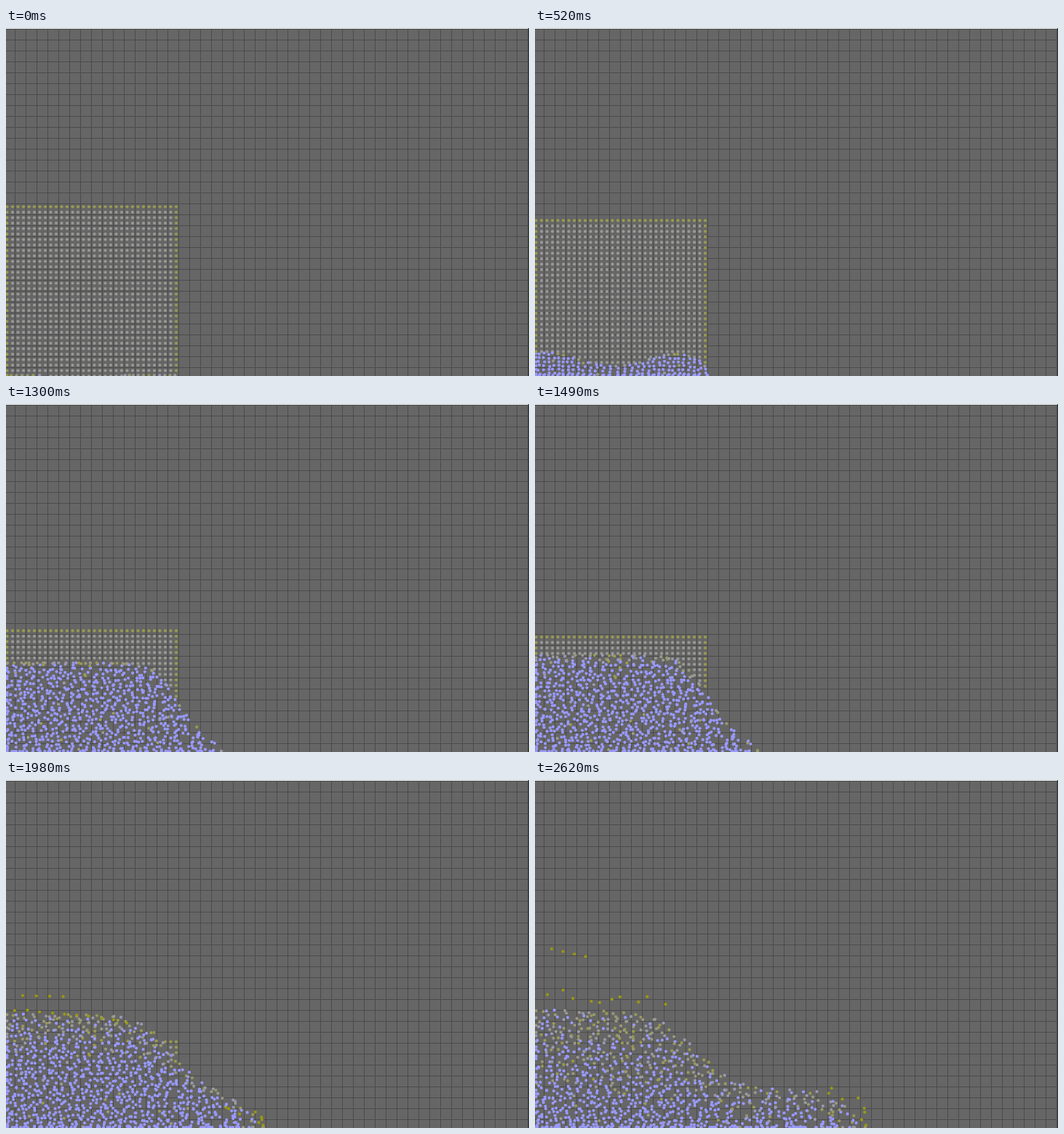
These frames come from a looping animation (719x478 px, 2.67 s). An HTML page with a canvas:

```html
<!DOCTYPE html>
<html lang="en">
<head>
<meta charset="utf-8">
<title>Particle block collapse</title>
<style>
html, body { margin: 0; width: 100%; height: 100%; overflow: hidden; background: #666; }
canvas { display: block; }
</style>
</head>
<body>
<canvas id="stage" width="719" height="478"></canvas>
<script>
const W = 719, H = 478, LOOP = 2670, N = 32, GAP = 7.5, EDGE = 237;
const ctx = document.getElementById('stage').getContext('2d');

const clamp = (v, a = 0, b = 1) => Math.max(a, Math.min(b, v));

// the simulation advances about every 110 ms, evenly between these moments
const marks = [20, 520, 940, 1300, 1750, 2220, 2620];
function stepTime(t) {
  if (t < marks[0]) return 0;
  const k = marks.findLastIndex(m => m <= t);
  if (k === marks.length - 1) return marks[k];
  const span = marks[k + 1] - marks[k];
  const step = span / Math.round(span / 110);
  return marks[k] + Math.floor((t - marks[k]) / step) * step;
}

function rand(n) {
  let h = Math.imul(n + 17, 0x9E3779B1);
  h = Math.imul(h ^ (h >>> 15), 0x85EBCA6B);
  h = Math.imul(h ^ (h >>> 13), 0xC2B2AE35);
  return ((h ^ (h >>> 16)) >>> 0) / 4294967296;
}

function dot(x, y, blue) {
  ctx.fillStyle = `rgb(153,153,${Math.round(blue)})`;
  ctx.beginPath();
  ctx.arc(x, y, 2.1, 0, Math.PI * 2);
  ctx.fill();
}

function drawGrid() {
  ctx.fillStyle = '#666';
  ctx.fillRect(0, 0, W, H);
  ctx.fillStyle = '#4b4b4b';
  for (let x = 12; x < W; x += 15) ctx.fillRect(x, 0, 1, H);
  for (let y = 1; y < H; y += 15) ctx.fillRect(0, y, W, 1);
  ctx.fillStyle = '#fff';
  ctx.fillRect(0, 0, W, 1);
  ctx.fillStyle = '#333';
  ctx.fillRect(W - 1, 0, 1, H);
}

const blockTop = t => 245.5 + 0.0268 * t + 1.84e-5 * t * t;
const frontX = t => EDGE + 218 * (t / 2620) ** 1.85;

// pile outline: a sinking shoulder on top of a low toe that runs to the right
function pileShape(t) {
  const full = 162 * (1 - Math.exp(-((t / 1127) ** 2.4)));
  const toe = 0.32 * full;
  const soft = 15 + 12 * clamp((t - 1500) / 700);
  const mid = 231 - 7 * clamp((t - 1750) / 800);
  const ripple = 10 * Math.exp(-(((t - 520) / 160) ** 2));
  const front = frontX(t);
  return x => {
    const body = (full - toe) / (1 + Math.exp((x - mid) / soft));
    const wave = ripple * Math.cos((x - 10) * Math.PI / 100);
    return toe * clamp((front - x) / 70) ** 0.6 + (body + wave) * clamp((front - x) / 20);
  };
}

// returns a function that maps a share of the pile's area to x
function areaMap(height, front) {
  const dx = 2, sums = [0];
  for (let x = 0; x < front; x += dx) {
    sums.push(sums[sums.length - 1] + Math.max(0, height(x + dx / 2)));
  }
  const total = sums[sums.length - 1];
  return share => {
    const goal = share * total;
    let k = 1;
    while (k < sums.length - 1 && sums[k] < goal) k++;
    const part = (goal - sums[k - 1]) / (sums[k] - sums[k - 1] || 1);
    return Math.min(front, (k - 1 + part) * dx);
  };
}

function drawBlock(t) {
  const top = blockTop(t), front = frontX(t);
  const height = pileShape(t);
  const toX = areaMap(height, front);
  const shake = clamp((t - 300) / 600, 0.1);
  const late = clamp((t - 1250) / 1370);

  const landed = Array.from({ length: N }, (_, i) =>
    clamp(N - 1 - (H - height(1.5 + GAP * i) - top) / GAP, 0, N));
  const count = landed.reduce((a, b) => a + b, 0);

  let before = 0;
  landed.forEach((n, i) => {
    for (let j = 0; j < N; j++) {
      if (j >= n) {
        const rim = i === 0 || i === N - 1 || j === N - 1;
        dot(1.5 + GAP * i, top + GAP * (N - 1 - j), rim ? 82 : 150);
        continue;
      }
      const id = (i * N + j) * 4;
      const jx = ((rand(id) - 0.5) * 1.1 + (j % 2 - 0.5) * 0.4) * shake;
      const jy = (rand(id + 1) - 0.5) * 1.1 * shake;
      const x = toX(clamp((before + n * (0.5 + jx)) / count));
      const rise = clamp((j + 0.5 + jy) / n) ** (1 + 0.2 * late);
      const y = H + 5 - (height(x) + 5) * rise;

      // thin spots near the surface and the front turn olive
      const crust = 1 - (1 - rise) / (0.01 + 0.8 * late);
      const tip = 1 - (front - x) / (10 + 60 * late);
      const thin = 0.85 * clamp(Math.max(crust, tip, 0.03));
      const grey = 70 + 120 * rand(id + 2);
      const dense = Math.min(255, 150 + t * 0.26);
      dot(Math.max(1.5, x * (1 + 4 / front) - 4), Math.min(477, y),
        rand(id + 3) < thin ? grey : dense);
    }
    before += n;
  });
}

function drawSplashes(t) {
  const dt = t - 1750, front = frontX(t);
  for (let k = 0; k < 4; k++) {
    dot(23 + 19 * k - 0.004 * k * dt, 306 - (0.085 - 0.004 * k) * dt, 15);
  }
  for (let k = 0; k < 10; k++) {
    const x = 11 + 17 * k;
    dot(x + 0.02 * dt * rand(k + 5), 320 + x * x / 1500 - dt * (0.02 + 0.025 * rand(k)), 20);
  }
  for (let k = 0; k < 8; k++) {
    const lift = 0.03 + 0.03 * rand(k + 70);
    dot(front - 9 * k * rand(k + 50), 474 - 3 * k - k * 0.12 * lift * Math.max(0, dt), 20);
  }
}

function draw(t) {
  drawGrid();
  drawBlock(t);
  if (t > 1600) drawSplashes(t);
}

const start = performance.now();
let shown = -1;
function tick() {
  const t = stepTime((performance.now() - start) % LOOP);
  if (t !== shown) draw(shown = t);
  requestAnimationFrame(tick);
}
tick();
</script>
</body>
</html>
```
